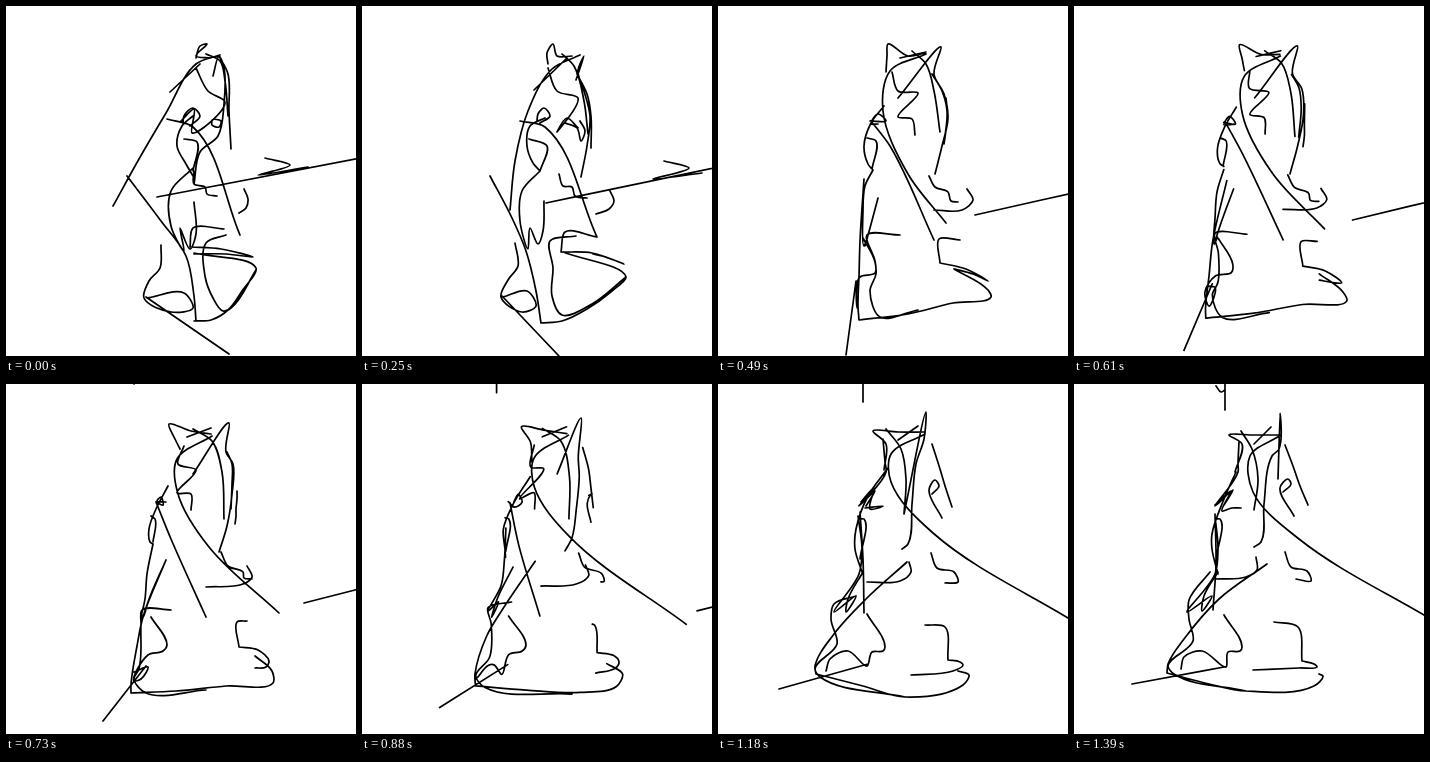
Write an HTML page with a canvas that moves like this. It is 350 px wide and 350 px high and loops after 1420 ms.

```html
<!DOCTYPE html>
<html lang="en">
<head>
<meta charset="utf-8">
<title>Morphing line drawing</title>
<style>
html, body { margin: 0; width: 100%; height: 100%; overflow: hidden; background: #fff; }
canvas { display: block; width: 350px; height: 350px; }
</style>
</head>
<body>
<canvas id="stage" width="350" height="350"></canvas>
<script>
const ctx = document.getElementById('stage').getContext('2d');
const LOOP = 1420, HOLD = 70, STEP = 30;
const keySteps = [0, 7, 15, 23, 32, 38, 45];
const strokes = [];

// One string of x,y points per key pose; a missing tail repeats the last pose.
function stroke(...poses) {
  const keys = poses.map(p => p.split(/[ ,]+/).map(Number));
  while (keys.length < keySteps.length) keys.push(keys[keys.length - 1]);
  strokes.push(keys);
}

// Ears and brow
stroke('190,52 194,40 201,38 190,50 205,52', '186,58 185,47 191,38 195,50 210,50',
  '168,66 169,50 170,38 190,50 207,47', '174,65 169,55 163,40 185,47 205,50',
  '166,88 168,60 157,45 180,46 205,49', '166,86 168,60 155,47 180,48 206,48',
  '161,88 168,60 155,51 180,51 206,51');
stroke('164,86 194,58', '172,84 205,52', '182,52 208,46', '181,53 205,44',
  '180,53 204,42', '180,56 200,42', '180,60 197,43');

// Sweeping head curve
stroke('214,49 190,58 160,107 133,153 107,200', '218,49 190,63 166,105 153,155 148,204',
  '208,48 172,65 165,105 190,168 228,217', '206,52 171,75 172,110 203,163 273,229',
  '207,50 173,72 172,97 210,145 360,247', '207,50 173,70 173,98 215,149 360,240',
  '207,51 176,72 179,108 225,155 360,237');

// Right ear running into the neck
stroke('207,70 213,50 218,62 218,98 212,130 194,146 188,178',
  '214,74 222,50 216,65 222,85 228,110 225,140 219,171',
  '180,92 223,41 216,68 226,88 230,112 224,140 217,168',
  '187,90 223,39 220,68 227,80 226,110 221,142 213,168',
  '199,95 215,30 212,75 208,100 204,135 200,163 194,166',
  '186,130 208,28 206,55 198,80 194,120 190,160 184,165',
  '204,95 206,29 205,65 198,72 190,120 187,158 180,163');

// Right cheek lines
stroke('213,50 222,68 223,105 225,143', '215,68 225,88 229,110 229,142',
  '214,68 224,85 229,105 226,138', '221,68 226,80 226,100 225,125',
  '219,60 226,88 231,106 236,124', '214,60 222,85 228,105 234,123',
  '211,61 219,82 226,102 234,121');
stroke('208,113 215,115 213,121 206,119 206,114', '218,115 223,125 219,135 215,122 203,117',
  '228,92 229,102 229,112 228,124 226,138', '231,107 231,115 230,125 230,132 229,140',
  '222,113 228,104 226,98 220,108 228,136', '214,110 221,102 217,96 211,106 224,134',
  '209,108 217,100 214,95 206,104 220,132');
stroke('200,48 214,55 219,75 222,110', '200,48 212,60 222,95 226,128',
  '194,45 208,58 216,85 222,126', '187,45 206,57 216,88 218,135',
  '175,44 192,58 199,95 197,133', '168,45 183,65 188,95 186,130',
  '167,47 178,65 184,95 180,126');

// Face zigzag
stroke('190,62 202,85 219,96 186,127 188,103 175,115', '186,62 195,85 216,92 195,126 205,112 216,122',
  '174,66 180,85 200,87 180,111 194,113 197,129', '178,62 172,80 190,86 171,109 185,110 185,126',
  '167,60 167,85 175,84 147,120 162,108 162,124', '165,55 167,78 168,88 141,122 157,107 148,122',
  '165,58 164,80 164,88 141,122 159,106 150,121');

// Left cheek and eye
stroke('187,110 176,120 171,140 180,158 187,170', '183,112 168,120 165,140 171,157 178,165',
  '166,100 153,117 146,140 150,158 155,164', '162,102 150,125 143,145 144,158 147,160',
  '173,85 152,115 140,145 142,170 142,185', '170,84 150,112 138,145 137,165 144,188',
  '162,88 150,115 138,150 138,165 144,190');
stroke('177,118 178,110 187,102 194,110 184,120', '175,115 176,108 182,102 188,110 178,117',
  '160,118 153,118 160,108 168,115 152,115', '160,118 151,117 155,113 157,121 150,118',
  '145,118 160,105 163,122 152,124 144,118', '143,118 156,104 152,125 165,122 147,124',
  '141,121 157,107 148,127 158,124 167,124');
stroke('178,133 191,136 187,165', '167,133 185,140 178,165', '149,132 158,135 154,163',
  '145,132 149,135 147,158', '142,135 146,135 142,175');

// Chest line
stroke('161,113 187,121 234,229', '158,115 183,121 235,231', '153,115 172,140 216,234',
  '150,118 165,155 200,233', '146,120 150,165 160,231', '142,128 145,175 146,229',
  '141,130 142,180 139,226');

// Back outline and elbow
stroke('187,162 165,185 165,220 178,245 174,222 184,243 190,228 188,196',
  '178,165 160,185 158,215 166,243 168,222 176,238 181,225 182,195',
  '155,164 147,180 145,205 146,240 149,233 147,240 152,222 160,192',
  '147,160 141,190 139,215 135,235 140,226 136,236 145,210 160,176',
  '142,132 144,165 140,190 119,223 135,212 126,231 129,218 144,190',
  '140,132 144,165 141,190 116,228 138,212 128,228 130,215 145,188',
  '141,132 144,165 141,190 113,228 138,212 128,227 130,212 144,188');
stroke('121,170 155,215 180,250 188,290 190,315', '128,170 150,212 164,245 174,285 179,317',
  '146,173 142,235 141,270 140,300 141,314', '160,176 137,233 131,262 125,300 125,309',
  '183,178 145,218 120,246 104,282 105,296', '189,178 148,215 116,250 97,282 98,290',
  '193,180 145,215 110,255 94,280 93,289');

// Belly
stroke('220,229 200,237 199,270 207,292 217,305 225,302 250,264',
  '214,230 188,235 191,262 190,290 200,309 230,298 264,271',
  '182,229 149,229 157,255 158,268 152,285 162,311 200,304',
  '165,226 136,226 135,240 133,285 128,295 140,309 200,306',
  '139,212 119,222 125,240 125,262 104,288 110,298 214,313',
  '138,212 116,220 113,235 119,260 97,285 102,293 187,313',
  '136,188 115,216 115,235 119,257 94,282 100,290 172,307');

// Left foot
stroke('155,239 154,262 143,275 138,292 165,306 187,302 178,287 141,292',
  '153,237 156,260 146,274 139,291 160,306 174,300 165,285 141,291',
  '145,232 157,256 157,267 142,271 139,278 139,302 140,280 139,275',
  '145,233 161,261 157,267 142,271 128,297 135,295 142,283 128,288',
  '148,231 166,261 163,267 151,270 150,283 130,270 114,279 107,295',
  '149,230 167,263 165,267 154,268 149,282 130,267 112,275 108,287',
  '150,231 168,263 166,267 154,268 152,283 128,267 110,273 107,285');

// Right foot and base
stroke('218,223 187,222 184,241', '235,231 203,226 199,246', '242,234 221,233 222,257',
  '241,237 231,238 233,263', '220,242 232,243 235,273', '207,241 227,243 230,276',
  '200,238 224,243 228,277');
stroke('184,241 215,243 247,251 220,248 188,248', '199,246 230,247 262,258 240,250 231,248',
  '222,257 248,263 270,275 255,268 237,263', '233,263 252,266 263,277 260,283 249,284',
  '235,273 250,276 252,279 246,284 217,291', '230,276 242,278 245,281 235,287 193,291',
  '228,277 240,280 243,283 225,284 179,286');
stroke('188,247 250,262 236,285 222,304 205,314 188,315', '201,246 264,271 250,285 225,303 200,315 179,317',
  '236,263 270,284 273,291 235,297 190,308 141,314', '249,272 266,287 267,299 220,302 170,307 125,309',
  '240,285 256,292 245,304 214,313 160,305 105,296', '240,287 251,291 245,301 187,313 145,302 98,290',
  '245,290 249,292 240,302 172,307 135,300 93,289');

// Paws
stroke('188,165 188,178 199,181 201,188 211,190', '197,168 201,180 210,181 213,190 225,192',
  '211,170 217,181 230,186 233,195 240,196', '215,168 222,182 237,188 238,194 246,195',
  '217,170 222,184 240,190 244,200 232,200', '213,169 219,184 236,188 240,198 227,199',
  '211,168 217,183 233,187 237,197 222,195');
stroke('238,183 242,193 240,202 233,207', '248,185 252,195 247,203 234,208',
  '249,183 255,194 244,204 216,204', '241,182 246,193 237,200 200,203',
  '208,180 210,190 195,200 162,201', '191,178 193,188 182,197 149,198',
  '182,173 183,186 172,193 141,195');

// Loose lines around the figure
stroke('140,291 223,348', '140,290 197,350', '138,275 128,349', '140,282 97,337',
  '150,279 65,313', '150,280 61,305', '150,283 58,300');
stroke('151,191 360,151', '184,197 380,156', '257,209 390,179', '298,219 400,193', '360,232 440,212');
stroke('259,152 284,159 252,169 302,161', '302,155 327,162 291,173 340,167', '365,160 390,166 360,177 400,172');
stroke('110,-90 110,-70', '118,-70 118,-45', '123,-50 123,-20', '128,-30 128,0',
  '140,-20 140,14', '145,-10 145,18', '151,-5 151,26');
stroke('110,-60 115,-55 119,-58', '114,-50 119,-45 123,-48', '118,-40 123,-35 127,-38',
  '124,-30 129,-25 133,-28', '132,-18 137,-12 141,-15', '138,-10 143,-4 146,-6', '142,2 147,8 151,6');

// Cubic Hermite through the key poses
function poseAt(keys, step) {
  let k = 0;
  while (k < keySteps.length - 2 && step >= keySteps[k + 1]) k++;
  const span = keySteps[k + 1] - keySteps[k], u = (step - keySteps[k]) / span;
  const slope = (j, i) => {
    const a = Math.max(j - 1, 0), b = Math.min(j + 1, keySteps.length - 1);
    return (keys[b][i] - keys[a][i]) / (keySteps[b] - keySteps[a]) * span;
  };
  return keys[k].map((from, i) => {
    const delta = keys[k + 1][i] - from, m0 = slope(k, i), m1 = slope(k + 1, i);
    return from + u * (m0 + u * (3 * delta - 2 * m0 - m1 + u * (m0 + m1 - 2 * delta)));
  });
}

// Smooth through gentle bends, sharp at hard turns
function trace(flat) {
  const pts = [];
  for (let i = 0; i < flat.length; i += 2) pts.push([flat[i], flat[i + 1]]);
  const segs = pts.slice(1).map(([x, y], i) => {
    const dx = x - pts[i][0], dy = y - pts[i][1], len = Math.hypot(dx, dy) || 1e-6;
    return { x: dx / len, y: dy / len, len };
  });
  const tangent = i => {
    const a = segs[Math.max(i - 1, 0)], b = segs[Math.min(i, segs.length - 1)];
    return [(a.x + b.x) / 2, (a.y + b.y) / 2];
  };
  ctx.moveTo(...pts[0]);
  segs.forEach(({ len }, i) => {
    const [p, q] = [pts[i], pts[i + 1]], [s, t] = [tangent(i), tangent(i + 1)], r = len / 3;
    ctx.bezierCurveTo(p[0] + s[0] * r, p[1] + s[1] * r, q[0] - t[0] * r, q[1] - t[1] * r, q[0], q[1]);
  });
}

function draw(now) {
  const t = now % LOOP;
  const step = t < HOLD ? 0 : 1 + Math.floor((t - HOLD) / STEP);
  ctx.fillStyle = '#fff';
  ctx.fillRect(0, 0, 350, 350);
  ctx.strokeStyle = '#000';
  ctx.lineWidth = 1.7;
  ctx.lineCap = ctx.lineJoin = 'round';
  ctx.beginPath();
  for (const keys of strokes) trace(poseAt(keys, step));
  ctx.stroke();
}

const start = performance.now();
function tick() {
  draw(performance.now() - start);
  requestAnimationFrame(tick);
}
tick();
</script>
</body>
</html>
```
